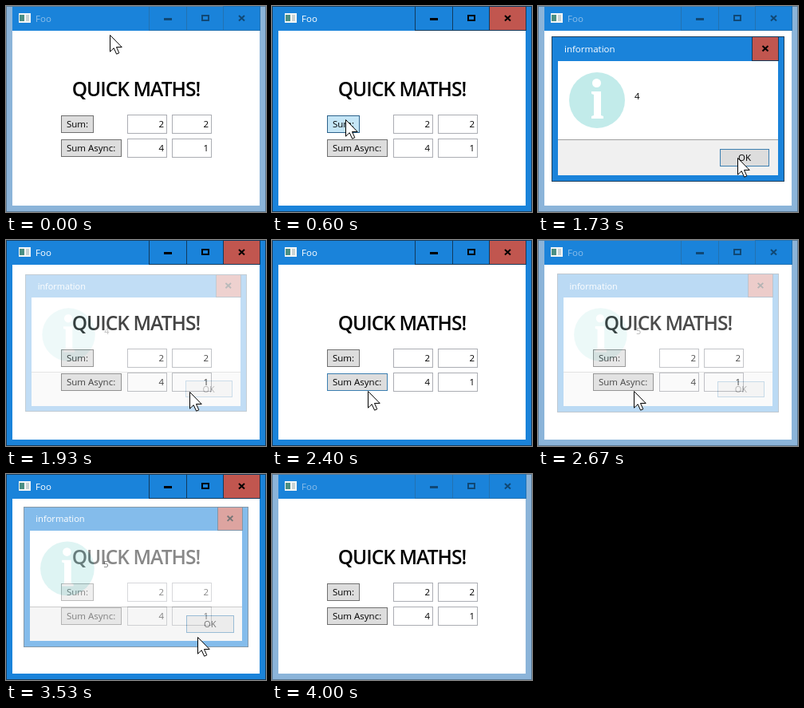
An HTML page for the animation above (4140 ms loop, 326 by 258 pixels).

```html
<!DOCTYPE html>
<html lang="en">
<head>
<meta charset="utf-8">
<title>Quick maths</title>
<style>
  html, body { margin: 0; width: 100%; height: 100%; overflow: hidden; background: #fff; }
  svg { display: block; width: 326px; height: 258px; }
  text { font: 11.5px "Open Sans", "Noto Sans", sans-serif; }
  rect, .rule { shape-rendering: crispEdges; }

  .window { --frame: #8bb4d9; --edge: #5d7b95; --line: #2372b1; --glyph: #104875; --title: #8cbee9; --close: #1a83da; }
  .window.active, .dialog { --frame: #1a83da; --edge: #1c3f5d; --line: #123a5c; --glyph: #000; --title: #fff; --close: #c1564f; }
  .frame { fill: var(--frame); stroke: var(--edge); }
  .caption { fill: #1a83da; }
  .title { fill: var(--title); }
  .rule { fill: none; stroke: var(--line); }
  .close { fill: var(--close); stroke: var(--line); }
  .glyph { fill: none; stroke: var(--glyph); stroke-width: 2; }

  .button rect { fill: #ddd; stroke: #707070; }
  .button.focus rect { stroke: #3c7fb1; }
  .button.hover rect { fill: #bee6fd; stroke: #3c7fb1; }
  .button.pressed rect { fill: #c4e5f6; stroke: #2c628b; }
  .field rect { fill: #fff; stroke: #abadb3; }
  .field text { text-anchor: end; }
  .heading { font-size: 24.5px; font-weight: 600; letter-spacing: -.95px; text-anchor: middle; }
  .dialog { transform-origin: 163px 129px; }
</style>
</head>
<body>
<svg viewBox="0 0 326 258">
  <g class="window" id="main">
    <rect class="frame" x=".5" y=".5" width="325" height="257"/>
    <rect class="caption" x="8" y="1" width="310" height="30"/>
    <rect x="8" y="31" width="310" height="219" fill="#fff"/>
    <g>
      <rect x="16" y="9" width="15" height="12" fill="#f4f6f6"/>
      <rect x="17" y="11" width="6" height="8" fill="#4b8f83"/>
      <rect x="25" y="11" width="4" height="8" fill="#c9d3d4"/>
    </g>
    <text class="title" x="37" y="20">Foo</text>
    <path class="rule" d="M179.5 1V30.5H272M226.5 1V30"/>
    <rect class="close" x="272.5" y=".5" width="46" height="30"/>
    <path class="glyph" d="M198 16.5h10" style="stroke-width:3"/>
    <rect class="glyph" x="246" y="12" width="8" height="6"/>
    <path class="glyph" d="M292 12l7 6.5m0-6.5l-7 6.5"/>

    <text class="heading" x="163" y="113">QUICK MATHS!</text>
    <g class="button" id="sum">
      <rect x="69.5" y="137.5" width="40" height="21"/><text x="76" y="152">Sum:</text>
    </g>
    <g class="button" id="async">
      <rect x="69.5" y="167.5" width="75" height="21"/><text x="76" y="182">Sum Async:</text>
    </g>
    <g class="field"><rect x="152.5" y="136.5" width="49" height="23"/><text x="198" y="152">2</text></g>
    <g class="field"><rect x="208.5" y="136.5" width="49" height="23"/><text x="254" y="152">2</text></g>
    <g class="field"><rect x="152.5" y="166.5" width="49" height="23"/><text x="198" y="182">4</text></g>
    <g class="field"><rect x="208.5" y="166.5" width="49" height="23"/><text x="254" y="182">1</text></g>
  </g>

  <g class="dialog" id="dialog">
    <rect class="frame" x="17.5" y="38.5" width="291" height="181"/>
    <rect x="25" y="69" width="276" height="143" fill="#fff"/>
    <rect x="25" y="167" width="276" height="45" fill="#f0f0f0"/>
    <rect x="25" y="167" width="276" height="1" fill="#a0a0a0"/>
    <text class="title" x="33" y="58">information</text>
    <rect class="close" x="268.5" y="38.5" width="33" height="30"/>
    <path class="glyph" d="M281.5 50l7 6.5m0-6.5l-7 6.5"/>
    <circle cx="74" cy="118" r="35" fill="#c2ebea"/>
    <circle cx="73.5" cy="96.5" r="5.5" fill="#fff"/>
    <path d="M67 107H79V137L82 138V141H67V138L70 137V111L67 110Z" fill="#fff"/>
    <text id="result" x="121" y="117">4</text>
    <g class="button" id="ok">
      <rect x="228.5" y="179.5" width="61" height="21"/><text x="259" y="194" text-anchor="middle">OK</text>
    </g>
  </g>

  <path id="cursor" d="M.5 .5V21.2L5.2 16.7L8.6 24.2L11.8 22.8L8.5 15.5H15.2Z" fill="#fff" stroke="#000"/>
</svg>
<script>
  const LOOP = 4140, TICKS = 62;
  const $ = id => document.getElementById(id);

  // Keys are [tick, ...values], at 15 ticks per second.
  const PATH = [[0, 130, 36], [8, 92, 142], [19, 92, 142], [26, 250, 190], [27, 250, 190],
    [35, 120, 189], [42, 120, 189], [48, 241, 190], [51, 241, 190], [58, 236, 262]];
  const FADE = [[11, 0], [14, .88], [19, .88], [20, 1], [26, 1], [27, .8], [30, 0],
    [39, 0], [42, .88], [43, 1], [51, 1], [52, .8], [55, 0]];

  const within = (n, from, to) => n >= from && n < to;
  const smooth = p => p * p * (3 - 2 * p);

  function sample(keys, n, ease = p => p) {
    const i = keys.findIndex(k => k[0] > n);
    if (i < 0) return keys.at(-1).slice(1);
    if (i === 0) return keys[0].slice(1);
    const a = keys[i - 1], b = keys[i];
    const p = ease((n - a[0]) / (b[0] - a[0]));
    return a.slice(1).map((v, j) => v + (b[j + 1] - v) * p);
  }

  function setState(id, state) {
    $(id).setAttribute("class", "button " + state);
  }

  function draw(n) {
    const active = within(n, 9, 11) || within(n, 27, 39) || within(n, 51, 60);
    $("main").classList.toggle("active", active);

    setState("sum", within(n, 7, 9) ? "hover" : within(n, 9, 11) ? "pressed" : "");
    setState("async", n === 36 ? "focus" : within(n, 37, 39) ? "pressed" : "");
    setState("ok", n === 48 ? "hover" : within(n, 49, 51) ? "pressed" : "focus");

    const [alpha] = sample(FADE, n);
    $("dialog").style.opacity = alpha;
    $("dialog").style.transform = `scale(${1 - .07 * (1 - alpha)})`;
    $("result").textContent = n < 35 ? "4" : "5";

    const [x, y] = sample(PATH, n, smooth).map(Math.round);
    $("cursor").setAttribute("transform", `translate(${x} ${y})`);
    $("cursor").style.display = n < 58 ? "" : "none";
  }

  const start = performance.now();
  function frame() {
    const t = (performance.now() - start) % LOOP;
    draw(Math.min(TICKS - 1, Math.floor((t + 3.4) * .015)));
    requestAnimationFrame(frame);
  }
  frame();
</script>
</body>
</html>
```
